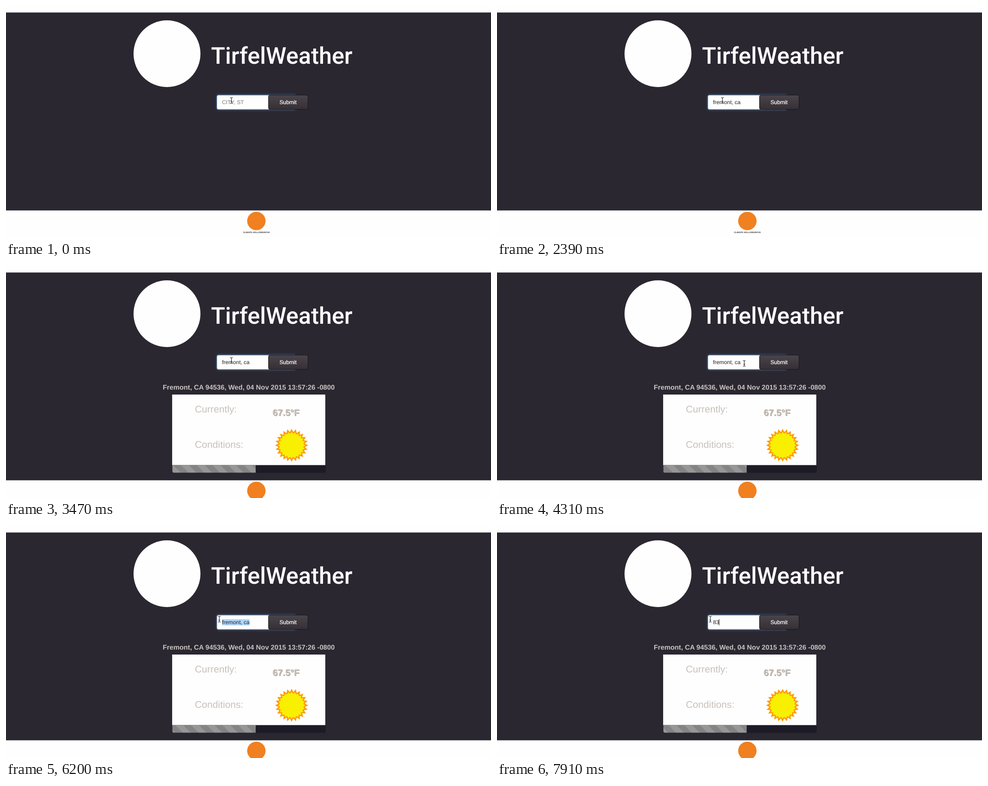
Write an HTML page that moves like this. It is 1080x518 px and loops after 8 s.

```html
<!DOCTYPE html>
<html lang="en">
<head>
<meta charset="utf-8">
<title>Weather lookup</title>
<style>
  html, body { margin: 0; width: 100%; height: 100%; overflow: hidden; background: #fefefe; }
  svg { display: block; width: 100vw; height: 100vh; }
  text { font-family: "Liberation Sans", Arial, sans-serif; text-rendering: geometricPrecision; white-space: pre; }
  .title { font: 500 51.8px Roboto, sans-serif; fill: #fefefe; }
  .field { font-size: 12.25px; }
  .button { fill: #fefefe; stroke: #fefefe; stroke-width: .25px; }
  .label { font-size: 21.6px; fill: #c8c0b9; }
  .bold { font-weight: 700; }
  .temp { font-size: 20.3px; fill: #c8c0b9; text-shadow: 1px 1px 0 #a9a19b; }
</style>
</head>
<body>
<svg viewBox="0 0 1080 518" xmlns="http://www.w3.org/2000/svg">
  <defs>
    <linearGradient id="buttonFill" x2="0" y2="1">
      <stop offset="0" stop-color="#4a454b"/>
      <stop offset=".55" stop-color="#3f393f"/>
      <stop offset="1" stop-color="#363036"/>
    </linearGradient>
    <filter id="glow" x="-10%" y="-50%" width="120%" height="200%">
      <feGaussianBlur stdDeviation="2.4"/>
    </filter>
    <pattern id="stripes" width="35" height="35" patternUnits="userSpaceOnUse">
      <rect width="35" height="35" fill="#848484"/>
      <path d="M0 0H17.5L35 17.5V35ZM0 17.5L17.5 35H0Z" fill="#979797"/>
    </pattern>
  </defs>

  <rect width="1080" height="518" fill="#fefefe"/>
  <rect id="page" y="14.5" width="1080" height="442"  fill="#2a2731"/>

  <circle cx="358.5" cy="106.5" r="74.5" fill="#fefefe"/>
  <text class="title" x="456.5" y="129">TirfelWeather</text>

  <rect x="469.5" y="198.5" width="176" height="33" rx="3.5" fill="#66afe9" opacity=".5" filter="url(#glow)"/>
  <rect x="469.8" y="199.2" width="175.5" height="31.6" rx="3" fill="#fefefe" stroke="#7dbbec" stroke-width=".8"/>
  <rect id="selection" y="208" height="14" fill="#b2d6fd"/>
  <text id="entry" class="field" x="481" y="219.3"></text>
  <rect id="caret" y="208" width="1" height="14" fill="#111"/>
  <rect x="584.5" y="198.9" width="88" height="32" rx="3.5" fill="url(#buttonFill)" stroke="#121114"/>
  <text class="field button" x="628" y="219.3" text-anchor="middle">Submit</text>

  <g id="results">
    <text class="bold" x="540.5" y="275.8" font-size="15.25" fill="#c8c3be" text-anchor="middle">Fremont, CA 94536, Wed, 04 Nov 2015 13:57:26 -0800</text>
    <rect x="370" y="287" width="341" height="157.5" fill="#fefefe"/>
    <text class="label" x="420.5" y="327">Currently:</text>
    <text class="label" x="420.5" y="405.5">Conditions:</text>
    <text class="temp bold" x="593.5" y="334">67.5°F</text>
    <polygon id="rays" fill="#ff9a0a"/>
    <polygon id="core" fill="#f8f000"/>
    <rect x="370.5" y="445" width="341.5" height="16.8" rx="3.5" fill="#1c1b26"/>
    <path d="M556 445V461.5H374Q370.5 461.5 370.5 458V445Z" fill="url(#stripes)"/>
  </g>

  <g id="footer">
    <circle cx="557.5" cy="480" r="20.5" fill="#f08020"/>
    <text class="bold" x="557.5" y="507.3" font-size="4.7" fill="#333" text-anchor="middle">CLIMATE HOLLOWGROVE</text>
  </g>

  <g id="pointer" fill="none" stroke-linecap="round"></g>
</svg>
<script>
const LOOP = 8000, RESULTS_AT = 2590, STRIPE = 35, TEXT_X = 481;
const $ = id => document.getElementById(id);
const city = "fremont, ca";

// [time, characters of the city typed]
const typing = [[0, 0], [530, 1], [710, 2], [800, 3], [880, 4], [1060, 6],
  [1320, 7], [1500, 8], [1670, 9], [1760, 10], [1850, 11]];
const retyping = [[0, ""], [7280, "8"], [7550, "83"]];
const caretSteps = [[0, 0], [360, 1], [2390, 0], [RESULTS_AT, 1], [3110, 0], [3640, 1], [4170, 0], [4640, 1]];

// [time, x, y]
const pointerPath = [[0, 502, 211], [3730, 502, 211], [4000, 530, 215], [4310, 550.5, 217.5],
  [4430, 558, 217], [4640, 558, 217], [4900, 551, 216], [5080, 535, 215], [5340, 500.5, 213],
  [5640, 481, 210], [5900, 475, 208], [LOOP, 475, 208]];
const SELECT_FROM = 4800, SELECT_LAG = 130;

const stepAt = (steps, t) => steps.findLast(s => s[0] <= t)[1];

function pointAt(t) {
  const i = Math.max(1, pointerPath.findIndex(p => p[0] > t));
  const [t0, x0, y0] = pointerPath[i - 1], [t1, x1, y1] = pointerPath[i];
  const k = (t - t0) / (t1 - t0);
  return [x0 + (x1 - x0) * k, y0 + (y1 - y0) * k];
}

function set(id, attrs) {
  for (const name in attrs) $(id).setAttribute(name, attrs[name]);
}

function star(id, tips, outer, inner) {
  const points = Array.from({ length: tips * 2 }, (_, i) => {
    const a = Math.PI * i / tips - Math.PI / 2, r = i % 2 ? inner : outer;
    return `${(636 + r * Math.cos(a)).toFixed(2)},${(400.3 + r * Math.sin(a)).toFixed(2)}`;
  });
  set(id, { points: points.join(" ") });
}

const entry = $("entry");
const edge = n => TEXT_X + (n ? entry.getSubStringLength(0, n) : 0);

// Character boundary nearest to the trailing pointer position.
function selectionStart(t) {
  const [x] = pointAt(t - SELECT_LAG);
  let best = city.length;
  for (let n = 0; n < city.length; n++) {
    if (Math.abs(edge(n) - x) < Math.abs(edge(best) - x)) best = n;
  }
  return best;
}

function draw(t) {
  const replaced = stepAt(retyping, t);
  const value = replaced || city.slice(0, stepAt(typing, t));
  const label = value || "CITY, ST";
  if (entry.textContent !== label) entry.textContent = label;
  entry.setAttribute("fill", value ? "#222" : "#777");

  const from = t >= SELECT_FROM && !replaced ? selectionStart(t) : city.length;
  const selecting = from < city.length;
  set("selection", {
    x: edge(selecting ? from : 0),
    width: selecting ? edge(city.length) - edge(from) : 0
  });
  set("caret", {
    x: Math.round(edge(value.length) - .6),
    opacity: selecting ? 0 : stepAt(caretSteps, t)
  });

  const shown = t >= RESULTS_AT;
  set("results", { visibility: shown ? "visible" : "hidden" });
  set("page", { height: shown ? 464 : 442 });
  set("footer", { transform: `translate(0 ${shown ? 22 : 0})` });
  const shift = shown ? (t - RESULTS_AT) / 2000 % 1 : 0;
  set("stripes", { patternTransform: `translate(${370.5 + STRIPE * (1 - shift)} 445)` });
  set("pointer", { transform: `translate(${pointAt(t)})` });
}

star("rays", 24, 37, 29.5);
star("core", 24, 30, 26);

// White halo below, dark stroke on top.
const beam = "M-2.6 -6.5Q-.3 -6.5 0 -5Q.3 -6.5 2.6 -6.5M0 -5V5M-2.6 6.5Q-.3 6.5 0 5Q.3 6.5 2.6 6.5M-1.5 2H1.5";
$("pointer").innerHTML =
  `<path d="${beam}" stroke="#fff" stroke-width="2.6" stroke-opacity=".75"/>` +
  `<path d="${beam}" stroke="#111" stroke-width="1.1"/>`;

const start = performance.now();
function tick() {
  draw((performance.now() - start) % LOOP);
  requestAnimationFrame(tick);
}
tick();
</script>
</body>
</html>
```
